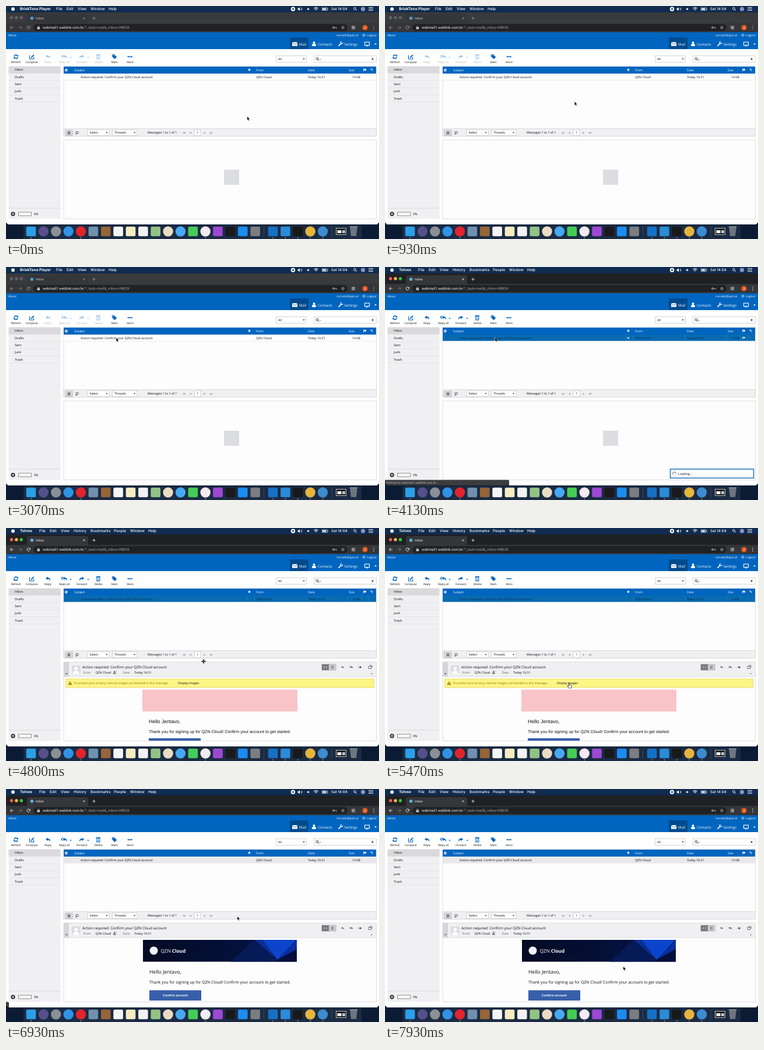
Write an HTML page with a canvas that moves like this. It is 640 px wide and 400 px high and loops after 8000 ms.

```html
<!DOCTYPE html>
<html lang="en">
<head>
<meta charset="utf-8">
<title>Webmail</title>
<style>
html, body { margin: 0; width: 100%; height: 100%; overflow: hidden; background: #fff; }
canvas { display: block; width: 640px; height: 400px; }
</style>
</head>
<body>
<canvas id="stage"></canvas>
<script>
const canvas = document.getElementById('stage');
const ratio = window.devicePixelRatio || 1;
canvas.width = 640 * ratio;
canvas.height = 400 * ratio;
const c = canvas.getContext('2d');
c.textRendering = 'geometricPrecision';

const LOOP = 8000;
const OPEN = '"Open Sans", sans-serif';
const INTER = 'Inter, sans-serif';
const ROBOTO = 'Roboto, sans-serif';
const ARIAL = '"Liberation Sans", sans-serif';
const BLUE = '#0065bf', PALE = '#a3c8e8', INK = '#0c0c0e', GREY = '#f0f0f2', LINE = '#cfcfd3';
const BRAND = 'QZN Cloud';
const SUBJECT = `Action required: Confirm your ${BRAND} account`;
const THANKS = `Thank you for signing up for ${BRAND}! Confirm your account to get started.`;

// Moments at which the interface changes
const T = { focus: 3400, pick: 3600, mail: 4500, unblock: 5700, images: 6700 };
// Pointer hot spot: time, x, y
const PATH = [
  [0, 414, 190], [500, 414, 190], [1500, 191, 125.5], [2600, 191, 125.5], [3200, 189, 121.5],
  [4350, 189, 121.5], [4800, 339, 229], [5250, 317, 268], [5900, 314, 266], [6250, 314, 266],
  [6850, 397, 219], [7150, 397, 219], [7750, 409, 305], [8000, 409, 305]
];

function rect(x, y, w, h, fill, stroke, lw = 0.7) {
  if (fill) { c.fillStyle = fill; c.fillRect(x, y, w, h); }
  if (stroke) { c.strokeStyle = stroke; c.lineWidth = lw; c.strokeRect(x, y, w, h); }
}
function round(x, y, w, h, r, fill) {
  c.beginPath(); c.roundRect(x, y, w, h, r); c.fillStyle = fill; c.fill();
}
function disc(x, y, r, fill) {
  c.beginPath(); c.arc(x, y, r, 0, 7); c.fillStyle = fill; c.fill();
}
function arc(x, y, r, a, b, color, lw = 1) {
  c.beginPath(); c.arc(x, y, r, a, b); c.strokeStyle = color; c.lineWidth = lw; c.stroke();
}
function trace(p) {
  c.beginPath();
  for (let i = 0; i < p.length; i += 2) c.lineTo(p[i], p[i + 1]);
}
function poly(p, fill) { trace(p); c.closePath(); c.fillStyle = fill; c.fill(); }
function line(p, color, lw = 0.7) { trace(p); c.strokeStyle = color; c.lineWidth = lw; c.stroke(); }
// y is the middle of the capitals
function text(s, x, y, size, color = INK, font = OPEN, weight = 400, align = 'left') {
  c.font = `${weight} ${size}px ${font}`;
  c.textAlign = align;
  c.fillStyle = color;
  c.fillText(s, x, y + size * 0.36);
  return c.measureText(s).width;
}
function at(x, y, draw, sx = 1, sy = sx) {
  c.save(); c.translate(x, y); c.scale(sx, sy); draw(); c.restore();
}

function caret(x, y, color, r = 1.8) { poly([x - r, y - r / 2, x + r, y - r / 2, x, y + r / 2], color); }
function cross(x, y, r, color, lw = 0.8) {
  line([x - r, y - r, x + r, y + r], color, lw);
  line([x + r, y - r, x - r, y + r], color, lw);
}
function star(x, y, r, color) {
  const p = [];
  for (let i = 0; i < 10; i++) {
    const a = i * Math.PI / 5 - Math.PI / 2, q = i % 2 ? r * 0.42 : r;
    p.push(x + q * Math.cos(a), y + q * Math.sin(a));
  }
  poly(p, color);
}
function gear(x, y, r, color, hole) {
  for (let i = 0; i < 8; i++) {
    const a = i * Math.PI / 4;
    line([x, y, x + r * Math.cos(a), y + r * Math.sin(a)], color, r * 0.4);
  }
  disc(x, y, r * 0.75, color);
  disc(x, y, r * 0.35, hole);
}
function lens(x, y, color) {
  arc(x - 0.6, y - 0.6, 1.9, 0, 7, color, 0.9);
  line([x + 0.9, y + 0.9, x + 2.8, y + 2.8], color, 1);
}
function flag(x, y, color) {
  rect(x - 2.2, y - 2.4, 0.7, 5, color);
  poly([x - 1.4, y - 2.3, x + 2.4, y - 1.9, x + 2.4, y + 0.8, x - 1.4, y + 0.6], color);
}
function reply(x, y, color, sx = 1, s = 1, all = false) {
  at(x, y, () => {
    poly([-4, -0.7, -0.4, -3.6, -0.4, -1.8, 2.6, -1.3, 4, 1, 3.4, 3.6, 2.4, 1, -0.4, 0.5, -0.4, 2.2], color);
    if (all) line([-3.4, -3.6, -6.6, -0.7, -3.4, 2.2], color, 1.2);
  }, sx * s, s);
}
function reload(x, y, r, color, lw) {
  arc(x, y, r, 0.4, 5.6, color, lw);
  poly([x + r + 0.7, y - r - 0.2, x + r + 0.7, y, x - r * 0.2 + 0.7, y - 0.2], color);
}
function refresh(x, y, r, color) {
  for (const s of [1, -1]) {
    at(x, y, () => {
      arc(0, 0, r, -2.9, -0.6, color, 1.6);
      poly([r + 1, -r - 0.6, r + 1, -0.6, 0.8, -0.6], color);
    }, s);
  }
}
function dropdown(label, x, y, w, h) {
  rect(x, y, w, h, '#fff', '#c4c4c8');
  text(label, x + 3.5, y + h / 2, 5.3);
  caret(x + w - 4.5, y + h / 2, '#333');
}

function menuBar(active) {
  rect(0, 0, 640, 11, '#102c50');
  disc(12, 5.2, 3, '#fff');
  text(active ? 'Tolvex' : 'BriskTone Player', 24, 5, 6.5, '#fff', INTER, 700);
  const items = active
    ? [['File', 57], ['Edit', 75], ['View', 94], ['History', 116], ['Bookmarks', 145], ['People', 185], ['Window', 213], ['Help', 244]]
    : [['File', 86], ['Edit', 104], ['View', 123], ['Window', 145], ['Help', 176]];
  for (const [s, x] of items) text(s, x, 5, 6.4, '#fff', INTER, 500);
  disc(492.5, 5.2, 3.7, '#fff');
  rect(491.2, 3.9, 2.6, 2.6, '#102c50');
  poly([500.5, 4, 502, 4, 504, 2, 504, 8.4, 502, 6.4, 500.5, 6.4], '#fff');
  for (const r of [1.8, 3.4]) arc(504.5, 5.2, r, -0.8, 0.8, '#fff', 0.7);
  disc(518.5, 5.2, 1.8, '#ddd');
  for (const r of [1.7, 3.6, 5.5]) arc(532, 8, r, -2.35, -0.8, '#fff', 1);
  rect(542.5, 3, 8.5, 4.5, null, '#fff');
  rect(543.5, 4, 5.5, 2.5, '#fff');
  rect(551.8, 4.3, 0.8, 2, '#fff');
  text('Sat 14:04', 558, 5, 6.2, '#fff', INTER, 500);
  lens(599, 5, '#fff');
  disc(612.5, 5.2, 3.6, '#8f8fc4');
  for (const y of [2.5, 5, 7.5]) line([622, y, 630, y], '#fff', 0.9);
}

function browser(active) {
  const ink = active ? '#e8eaed' : '#96989c';
  rect(0, 11, 640, 19, active ? '#202124' : '#393a3d');
  round(36, 14, 105, 20, 3.5, '#35363a');
  rect(0, 29, 640, 16, '#35363a');
  const lights = active ? ['#fc5b57', '#fdbc40', '#34c84a'] : ['#606165', '#606165', '#606165'];
  lights.forEach((col, i) => disc(9.5 + i * 8.4, 20, 2.7, col));
  disc(44.5, 21, 2.8, active ? '#63b1d8' : '#4f9bc4');
  text('Inbox', 51, 21, 5.7, active ? '#e8eaed' : '#bfc1c4', ROBOTO);
  cross(134, 21, 1.6, ink);
  line([148.5, 21, 153.5, 21], ink, 0.9);
  line([151, 18.5, 151, 23.5], ink, 0.9);
  for (const [x, d, col] of [[10, 1, ink], [24.5, -1, '#77797d']]) {
    line([x - 2.7 * d, 37, x + 2.7 * d, 37], col, 0.9);
    line([x, 34.2, x - 2.8 * d, 37, x, 39.8], col, 0.9);
  }
  reload(38.5, 37, 2.6, ink, 0.9);
  round(47, 31, 539, 12, 6, '#202124');
  rect(53.5, 36.2, 4.6, 3.6, '#c4c7cb');
  arc(55.8, 36, 1.5, Math.PI, 0, '#c4c7cb', 0.7);
  const host = 'webmail1.weblink.com.br';
  const w = text(host, 63, 36.9, 6.2, '#f1f3f4', ROBOTO);
  text('/?_task=mail&_mbox=INBOX', 63 + w, 36.9, 6.2, '#9aa0a6', ROBOTO);
  arc(562, 37, 1.4, 0, 7, '#c4c7cb', 0.9);
  line([563.4, 37, 567.2, 37, 567.2, 38.6], '#c4c7cb', 0.9);
  star(578, 37, 3.4, '#c4c7cb');
  star(578, 37, 2, '#202124');
  rect(593, 34, 6, 6, '#85878b');
  disc(616, 37, 4.6, '#e5591c');
  text('J', 616, 37, 5.5, '#fff', ROBOTO, 400, 'center');
  for (const y of [34.3, 37, 39.7]) disc(631, y, 0.75, ink);
}

function siteHeader() {
  rect(0, 45, 640, 29, BLUE);
  text('About', 4, 50, 5, '#fff');
  text('norvaki@qulz.at', 604.5, 50, 5, '#fff', OPEN, 400, 'right');
  arc(614, 50, 1.9, -0.9, 4.05, '#fff', 0.8);
  line([614, 47.5, 614, 50], '#fff', 0.8);
  text('Logout', 619, 50, 5.1, '#fff');
  rect(487, 54, 32, 20, '#004a8e');
  rect(491, 62, 9, 6.6, '#fff');
  line([491, 62.5, 495.5, 66, 500, 62.5], '#004a8e', 0.8);
  text('Mail', 503, 65.5, 6.3, '#fff');
  disc(528.5, 63, 2, '#fff');
  round(525, 65, 7, 4, 1.8, '#fff');
  text('Contacts', 535, 65.5, 6.1, '#fff');
  line([570.5, 68.6, 575, 64], '#fff', 1.7);
  arc(576, 63, 1.8, 0, 4.7, '#fff', 1.3);
  text('Settings', 580.5, 65.5, 6.1, '#fff');
  rect(615.5, 62, 8, 5.4, null, '#fff', 1.1);
  rect(617.5, 68.4, 4, 0.9, '#fff');
  poly([632, 66, 636, 66, 634, 63.5], '#fff');
}

function toolbar(picked) {
  const off = picked ? BLUE : PALE;
  refresh(17, 87, 3, BLUE);
  line([40.5, 84.5, 40.5, 91, 47.5, 91, 47.5, 87.5], BLUE, 1.2);
  line([43, 88.8, 47.8, 83.8], BLUE, 1.8);
  reply(72, 87, off);
  reply(101, 87, off, 1, 0.95, true);
  caret(111, 88.5, off);
  reply(130, 87, off, -1);
  caret(141, 88.5, off);
  rect(155.8, 84.5, 5, 6.5, null, off, 1.1);
  rect(154.6, 83, 7.4, 1.1, off);
  rect(157.8, 86, 1, 4, off);
  poly([181.8, 83, 185.4, 83, 190.2, 87.6, 186.6, 91.2, 181.8, 86.6], BLUE);
  disc(183.5, 84.7, 0.8, '#fff');
  for (const x of [209.8, 212.7, 215.6]) disc(x, 87, 1.2, BLUE);
  const labels = [['Refresh', 17], ['Compose', 44], ['Reply', 72, 1], ['Reply all', 100, 1], ['Forward', 130, 1],
    ['Delete', 158.5, 1], ['Mark', 186, 0], ['More', 213]];
  for (const [s, x, dep] of labels) text(s, x, 96, 4.7, dep && !picked ? '#b4b4b8' : INK, OPEN, 400, 'center');
  dropdown('All', 463.5, 85.5, 52, 11);
  rect(528.5, 85.5, 107, 11, '#fff', '#c4c4c8');
  lens(534.5, 91, '#222');
  caret(539, 91.5, '#222', 1.2);
  cross(629, 91, 1.5, '#222', 1);
}

function sidebar() {
  rect(4.5, 103.5, 89, 262, GREY);
  rect(4.5, 103.5, 89, 12, '#dadadd');
  ['Inbox', 'Drafts', 'Sent', 'Junk', 'Trash'].forEach((s, i) => {
    text(s, 15, 109.5 + i * 12.3, 5.5);
    line([4.5, 115.7 + i * 12.3, 93.5, 115.7 + i * 12.3], '#dcdce0', 0.6);
  });
  line([4.5, 347, 93.5, 347], LINE);
  gear(12, 357, 4, '#333', GREY);
  rect(21.5, 354, 22, 6, '#f8f8f8', '#777', 0.8);
  text('0%', 48, 357.5, 5.3);
}

function messageList(picked, blurred, loading) {
  rect(99, 104, 536.5, 119, '#fdfdfe', LINE);
  rect(99, 104, 536, 12, BLUE);
  gear(103.3, 110, 2.5, '#fff', BLUE);
  for (const [s, x] of [['Subject', 117], ['From', 429], ['Date', 518], ['Size', 588]]) text(s, x, 110, 5.3, '#fff');
  star(417.5, 109.5, 2.8, '#fff');
  flag(615.5, 110, '#fff');
  line([628.8, 111.6, 625.8, 108.2, 627, 107.4, 629.4, 110.2], '#fff', 0.9);

  const lit = picked && !blurred;
  const ink = lit ? '#082c52' : INK;
  rect(99, 116, 536, 11, lit ? '#086bb2' : blurred ? '#e9e9ed' : '#fff');
  line([99, 127.2, 635.5, 127.2], '#dedee2', 0.6);
  if (lit) {
    for (const x of [414, 426.5, 515, 586, 610, 622]) line([x, 116.5, x, 127], '#3b88c5', 0.5);
    if (loading) {
      star(417.5, 122, 2.6, '#b8d6ee');
      flag(615.5, 122, '#b8d6ee');
    }
  }
  text(SUBJECT, 128, 121.7, 5.35, ink);
  text(BRAND, 429, 121.7, 5.3, ink);
  text('Today 16:31', 518, 121.7, 5.3, ink);
  text('14 KB', 608, 121.7, 5.3, ink, OPEN, 400, 'right');

  rect(99, 210.5, 536.5, 12.8, GREY, LINE);
  rect(102, 213, 12, 9.5, '#dcdce0', '#aaa');
  for (const y of [216, 217.8, 219.6]) line([105.5, y, 110.5, y], '#333', 0.9);
  c.beginPath(); c.ellipse(122, 217.2, 2.5, 1.9, 0, 0, 7); c.strokeStyle = '#333'; c.lineWidth = 0.8; c.stroke();
  line([120.5, 218.7, 120, 220.5, 122, 219.2], '#333');
  dropdown('Select', 140, 212.5, 37.5, 10);
  dropdown('Threads', 182.5, 212.5, 42.5, 10);
  text('Messages 1 to 1 of 1', 243, 217.5, 5.3);
  const arrow = (x, d) => poly([x - 1.4 * d, 216, x - 1.4 * d, 219.4, x + 1.4 * d, 217.7], '#999');
  arrow(306, -1); rect(303.6, 216, 0.8, 3.4, '#999');
  arrow(316.5, -1);
  arrow(341, 1);
  arrow(351.5, 1); rect(353.1, 216, 0.8, 3.4, '#999');
  rect(323, 212.3, 11, 10.5, '#fff', '#c4c4c8');
  text('1', 328.5, 217.5, 5.3, INK, OPEN, 400, 'center');
}

function messageHead() {
  rect(99, 230, 536.5, 25, GREY);
  rect(99, 230, 9, 25, '#d6d6da');
  caret(103.8, 250.5, '#333');
  line([99, 255, 635.5, 255], LINE);
  rect(113, 236, 14.5, 14.5, '#dcdce0');
  disc(120.3, 241.2, 2.9, '#fff');
  poly([114.5, 250.5, 115.5, 247, 118.5, 245, 122, 245, 125, 247, 126, 250.5], '#fff');
  text(SUBJECT, 131, 238.3, 6.25);
  text('From', 132.5, 248.3, 5.3, '#666');
  text(BRAND, 153.5, 248.3, 5.3);
  disc(186.2, 246.3, 1.4, '#777');
  round(183.7, 248, 5, 2.6, 1.2, '#777');
  text('+', 188.3, 246.5, 4.5, '#777');
  text('Date', 200.5, 248.3, 5.3, '#666');
  text('Today 16:31', 220, 248.3, 5.3);
  rect(542, 234, 12, 10, '#77777c', '#888');
  rect(554, 234, 12, 10, '#d4d4d8', '#999');
  line([546.8, 237.5, 545.2, 239, 546.8, 240.5], '#fff', 0.8);
  line([549.2, 237.5, 550.8, 239, 549.2, 240.5], '#fff', 0.8);
  for (const y of [237, 239, 241]) line([557.5, y, 562.5, y], '#444', 0.8);
  reply(577.5, 239, '#444', 1, 0.55);
  reply(593, 239, '#444', 1, 0.55, true);
  line([604.5, 239, 609.3, 239], '#444', 0.9);
  poly([607.2, 236.8, 610.2, 239, 607.2, 241.2], '#444');
  rect(622, 237.5, 4.4, 4, null, '#444');
  line([623.5, 236, 628, 236, 628, 240], '#444');
  caret(627.5, 250.5, '#444', 1.5);
}

function banner() {
  c.save();
  c.beginPath(); c.rect(235, 259, 264, 37.5); c.clip();
  const g = c.createLinearGradient(235, 0, 499, 0);
  g.addColorStop(0, '#050b24'); g.addColorStop(0.6, '#04103a'); g.addColorStop(1, '#04135a');
  rect(235, 259, 264, 38, g);
  poly([385, 297, 427, 259, 466, 293, 461, 297], '#061a58');
  poly([427, 259, 440, 259, 466, 293], '#0a2f96');
  poly([440, 259, 498, 259, 466, 293], '#0c45cc');
  poly([499, 259, 499, 275, 466, 293], '#0a2f9d');
  poly([466, 293, 499, 275, 499, 297, 461, 297], '#050f3c');
  c.restore();
  disc(253.5, 277.5, 7, '#eef1f8');
  const w = text('QZN ', 265.5, 278, 8.2, '#fff');
  text('Cloud', 265.5 + w, 278, 8.2, '#fff', OPEN, 700);
}

function preview(t) {
  rect(99, 230, 536.5, 135.5, '#fdfdfe');
  const blank = t < T.mail;
  const open = !blank && (t < T.unblock || t >= T.images);
  if (blank) rect(374, 281, 26, 26, '#dcdde1');
  if (open) {
    c.save();
    c.beginPath(); c.rect(99, 229.5, 537, 135.7); c.clip();
    messageHead();
    if (t < T.unblock) {
      rect(102.5, 259, 529, 15, '#fdf584', '#ddd25c');
      poly([110, 262.8, 113.6, 269.3, 106.4, 269.3], '#a17f12');
      rect(109.6, 264.8, 0.8, 2.4, '#fdf584');
      rect(109.6, 267.8, 0.8, 0.8, '#fdf584');
      text('To protect your privacy, remote images are blocked in this message.', 116, 266.5, 5.2, '#8d7110');
      text('Display images', 295, 266.5, 5.2);
      rect(234, 277.5, 266, 37.5, '#f8c4c7');
      text('Hello Jentavo,', 245, 331.5, 8.6, INK, ARIAL);
      text(THANKS, 245, 349, 7.15, INK, ARIAL);
      rect(245, 361, 89, 18, '#355fa9');
    } else {
      banner();
      text('Hello Jentavo,', 246, 313.5, 8.6);
      text(THANKS, 246, 332, 6.75);
      rect(246, 345.5, 89, 17.7, '#375fa9');
      text('Confirm account', 290.5, 354.2, 5.4, '#fff', ARIAL, 700, 'center');
    }
    c.restore();
  }
  rect(99, 230, 536.5, 135.5, null, LINE);
}

function loadingBox(t) {
  rect(489.5, 347, 143, 15.3, '#fff', '#1f73bb', 1.5);
  const a = t / 1000 * Math.PI * 2;
  arc(496.5, 355, 3, 0, 7, '#d8d8dc', 0.9);
  arc(496.5, 355, 3, a + 2, a + 5.2, '#555', 0.9);
  text('Loading...', 503, 355, 5.4);
}

function statusBubble(w) {
  round(-3, 365.5, w + 3, 12, 2, '#3b3c3f');
  if (w > 120) text('Waiting for webmail1.weblink.com.br...', 2, 370.2, 5.2, '#b7b9bd', ROBOTO);
}

// Plain dock tiles: s is a square, o a circle
const DOCK = ('s2b9fe8 o56508a o8b9097 o2f93e6 oe1242d s7091ad s966538 sf4f4f4 sf6ecc0 sf2f2f2 s93c285 ' +
  'oeadcc4 o46a9f2 s45cc57 of4eaf2 s9d48d4 s1a1a1c s1c8cf0 s7b7d81 s1571c6 s2a8bd6 s18191b oe6b53c o3d8cd0').split(' ');
function dock() {
  const night = '#0a1b33';
  rect(0, 375, 640, 25, night);
  poly([0, 371.5, 0, 375, 3.5, 375], night);
  poly([640, 371.5, 640, 375, 636.5, 375], night);
  round(30, 376, 580, 30, 3, '#1b2b43');
  DOCK.forEach((d, i) => {
    const x = 43 + i * 21.37 + (i > 18 ? 9 : 0), fill = '#' + d.slice(1);
    if (d[0] === 'o') disc(x, 387, 8.7, fill);
    else round(x - 8.3, 378.7, 16.6, 16.6, 2.5, fill);
    if ([0, 4, 14, 19, 20, 21, 22, 23].includes(i)) disc(x, 398, 0.8, '#dfe2e6');
  });
  for (const x of [442.5, 559]) line([x, 379, x, 396], '#4d5b70', 0.6);
  rect(566.5, 381.5, 17, 11, '#17191d', '#e8e8e8', 0.8);
  rect(568.5, 385, 7, 5, '#f2f2f2');
  rect(577, 385, 5, 5, '#bfc3c8');
  poly([590, 379, 603, 379, 601, 395, 592, 395], '#69717b');
  line([590, 379, 603, 379], '#b4bac2', 1);
  for (const x of [593.5, 596.5, 599.5]) line([x, 381, x, 394], '#858c96', 0.5);
}

function pointerAt(t) {
  let i = 1;
  while (PATH[i][0] < t) i++;
  const [t0, x0, y0] = PATH[i - 1], [t1, x1, y1] = PATH[i];
  const u = (t - t0) / (t1 - t0), k = u * u * (3 - 2 * u);
  return [x0 + (x1 - x0) * k, y0 + (y1 - y0) * k];
}
function outlined(p, fill, edge, lw) {
  trace(p); c.closePath();
  c.lineJoin = 'round';
  c.strokeStyle = edge; c.lineWidth = lw; c.stroke();
  c.fillStyle = fill; c.fill();
  c.lineJoin = 'miter';
}
function pointer(t) {
  const [x, y] = pointerAt(t);
  at(x, y, () => {
    if (t > 5000 && t < 6250) {
      outlined([-0.8, -0.8, 0.2, -0.8, 0.6, 2, 3.2, 2.6, 3.6, 4, 2.9, 7.2, -0.5, 7.2, -2.6, 4.2, -1.8, 3.6, -0.6, 4.5],
        '#fff', '#000', 1.4);
    } else if (t > T.mail && y > 223.3 && y < 230) {
      line([-4, 0, 4, 0], '#fff', 2.6); line([0, -4, 0, 4], '#fff', 2.6);
      line([-3.2, 0, 3.2, 0], '#000', 1.2); line([0, -3.2, 0, 3.2], '#000', 1.2);
      for (const d of [-1, 1]) {
        poly([d * 2, -1.5, d * 3.8, 0, d * 2, 1.5], '#000');
        poly([-1.5, d * 2, 0, d * 3.8, 1.5, d * 2], '#000');
      }
    } else {
      outlined([0, 0, 0, 5.6, 1.3, 4.5, 2.3, 6.8, 3.2, 6.4, 2.3, 4.2, 4, 4.1], '#000', '#fff', 1);
    }
  });
}

function draw(t) {
  c.setTransform(ratio, 0, 0, ratio, 0, 0);
  rect(0, 0, 640, 400, '#fff');
  const active = t >= T.focus, picked = t >= T.pick;
  const first = picked && t < T.mail, second = t >= T.unblock && t < T.images;
  browser(active);
  menuBar(active);
  siteHeader();
  toolbar(picked);
  sidebar();
  messageList(picked, t >= T.unblock - 50, first);
  preview(t);
  if (first || second) loadingBox(t);
  if (first || (t >= T.unblock && t < 6900)) statusBubble(213);
  else if (t >= 6900 && t < 6960) statusBubble(5);
  dock();
  pointer(t);
}

function tick(now) {
  draw(now % LOOP);
  requestAnimationFrame(tick);
}
draw(0);
requestAnimationFrame(tick);
</script>
</body>
</html>
```
